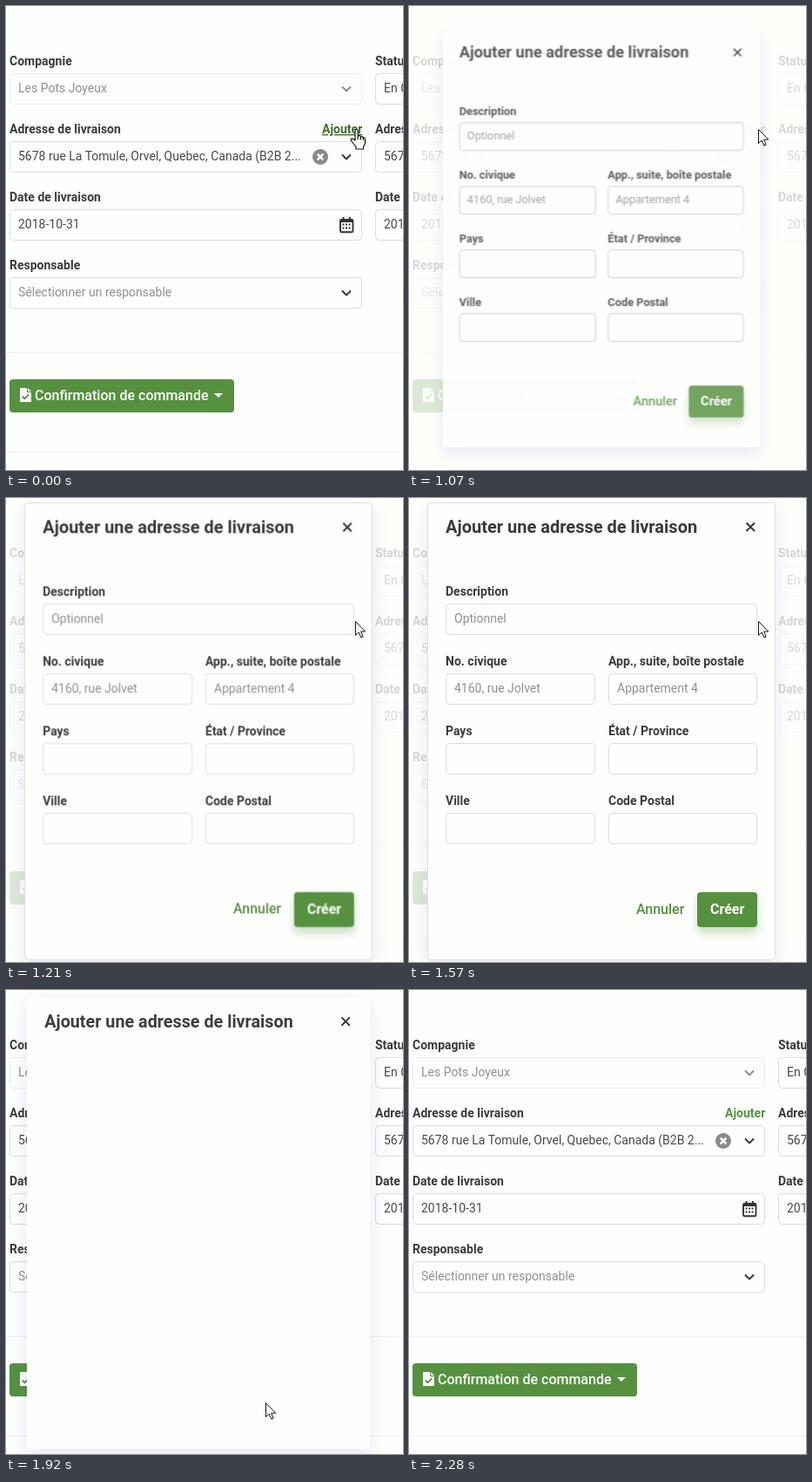
Animation, 456 px wide and 532 px high, one loop 2.35 s. Source, as an HTML page:

```html
<!DOCTYPE html>
<html lang="fr">
<head>
<meta charset="utf-8">
<title>Adresse de livraison</title>
<style>
  html, body { margin: 0; width: 100%; height: 100%; overflow: hidden; background: #fefefc; }
  svg { display: block; width: 100%; height: 100%; }
  text { font: 14px Roboto, sans-serif; fill: #484848; white-space: pre; }
  .label { font-weight: 700; fill: #3a3a3a; }
  .hint { fill: #909090; }
  .title { font-size: 20px; font-weight: 700; fill: #3a3a3a; }
  .link { font-weight: 700; fill: #55913f; }
  .action { font-size: 16px; font-weight: 500; }
  .hover { fill: #3c6f2b; text-decoration: underline; }
  .white { fill: #fff; }
  .field { fill: #fefefe; stroke: #dcdcdc; }
  .off { stroke: #eee; }
  .green { fill: #55913f; }
  .line { fill: none; stroke: #333; stroke-width: 1.9; }
  .rule { stroke: #efefef; }
  #sheet { fill: #fefefd; stroke: #dedede; filter: drop-shadow(0 7px 10px rgba(80, 80, 200, .13)); }
  #create { filter: drop-shadow(0 7px 5px rgba(85, 145, 63, .3)); }
  .moving #sheet { stroke: none; }
  .moving .field { stroke: #c0c0c0; }
  .cursor { fill: #fff; stroke: #111; stroke-linejoin: round; }
</style>
</head>
<body>
<svg viewBox="0 0 456 532">
  <g id="page"></g>
  <rect id="overlay" width="456" height="532" fill="#fefefc" opacity=".8"/>
  <g id="modal">
    <rect id="sheet" x="21.5" y="5.5" width="399" height="524" rx="4"/>
    <g id="content">
      <text class="title" x="42" y="40">Ajouter une adresse de livraison</text>
      <path class="line" d="M387.5 28.5l9.5 9.5m0-9.5l-9.5 9.5"/>
      <g id="form"></g>
    </g>
  </g>
  <path id="arrow" class="cursor" d="M.5 .5v16l3.7-3.5 2.6 6 2.4-1-2.6-5.9h5.1z"/>
  <path id="hand" class="cursor" stroke-width="1.2"
    d="M0 13V2Q0 .5 1.6 .5T3.2 2v6q2.6-1 3.2 1 2.2-.8 2.8 1 2.3-.3 2.3 2v4.5l-2 4v2.5H1v-2.5l-5.5-7q-1-2 .7-2.4T0 13zM3.2 8v4M6.4 9v3.5M9.2 10v3"/>
</svg>
<script>
const el = id => document.getElementById(id);
const text = (x, y, words, cls = '', id = '') => `<text id="${id}" class="${cls}" x="${x}" y="${y}">${words}</text>`;
const box = (x, y, w, cls = '') => `<rect class="field ${cls}" x="${x + .5}" y="${y + .5}" width="${w}" height="35" rx="4"/>`;
const chevron = (y, color = '#333') => `<path class="line" style="stroke:${color}" d="M386 ${y}l5 5 5-5"/>`;

// One labelled input; `top` is the upper edge of its box.
const field = (x, top, w, label, value = '', cls = '', boxCls = '') =>
  text(x, top - 9, label, 'label') + box(x, top, w, boxCls) + text(x + 10, top + 22, value, cls);

const clearIcon = `<circle cx="361" cy="173" r="9" fill="#8a8a8a"/>
  <path d="M357.7 169.7l6.6 6.6m0-6.6l-6.6 6.6" stroke="#fff" stroke-width="2.4"/>`;

let days = '';
for (let i = 0; i < 6; i++) days += `M${386.5 + i % 3 * 3.5} ${250.5 + (i / 3 | 0) * 4}h2`;
const calendarIcon = `<rect class="line" x="384" y="245" width="14.5" height="14.2" rx="1.5"/>
  <path class="line" d="M384 247h14.5M387.5 242v4M395 242v4"/><path class="line" d="${days}"/>`;

const fileIcon = `<path class="white" d="M17 438h7v5h5v10q0 1-1 1H17q-1 0-1-1v-14q0-1 1-1zM25 438l4 4h-4z"/>
  <path d="M18.8 447.5l2.6 2.6 4.8-4.8" fill="none" stroke="#55913f" stroke-width="1.9"/>`;

el('page').innerHTML =
  field(4, 77, 404, 'Compagnie', 'Les Pots Joyeux', 'hint', 'off') + chevron(92.5, '#8c8c8c') +
  field(4, 155, 404, 'Adresse de livraison', '5678 rue La Tomule, Orvel, Quebec, Canada (B2B 2...') +
  text(363, 146, 'Ajouter', 'link', 'add') + clearIcon + chevron(170.5) +
  field(4, 233, 404, 'Date de livraison', '2018-10-31') + calendarIcon +
  field(4, 311, 404, 'Responsable', 'Sélectionner un responsable', 'hint') + chevron(326.5) +
  field(424, 77, 404, 'Statut', 'En Cours') +
  field(424, 155, 404, 'Adresse de facturation', '5678 rue') +
  field(424, 233, 404, 'Date de commande', '2018-10-31') +
  `<path class="rule" d="M0 397.5h456M0 511.5h456"/>
  <rect class="green" x="4" y="428" width="258" height="38" rx="4"/>` + fileIcon +
  text(33, 452, 'Confirmation de commande', 'action white') +
  '<path class="white" d="M239 444h10l-5 5z"/>';

el('form').innerHTML =
  field(42, 121, 357, 'Description', 'Optionnel', 'hint') +
  field(42, 201, 171, 'No. civique', '4160, rue Jolvet', 'hint') +
  field(229, 201, 170, 'App., suite, boîte postale', 'Appartement 4', 'hint') +
  field(42, 281, 171, 'Pays') + field(229, 281, 170, 'État / Province') +
  field(42, 361, 171, 'Ville') + field(229, 361, 170, 'Code Postal') +
  text(261, 477, 'Annuler', 'link action', 'cancel') +
  '<rect id="create" class="green" x="331" y="452" width="69" height="40" rx="4"/>' +
  '<text class="action white" style="font-weight:700" x="346" y="477">Créer</text>';

const LOOP = 2350;
const TICKS = [0, 920, 1000, 1070, 1140, 1210, 1280, 1350, 1850, 1920, 2000, 2070, 2140, 2210, 2280];
const OPEN = 983, HOVER = 1850, CLOSE = 1918, DURATION = 260;

// cubic-bezier(.25, .8, .25, 1), solved for x by bisection
function ease(x) {
  if (x <= 0) return 0;
  if (x >= 1) return 1;
  let low = 0, high = 1;
  for (let i = 0; i < 24; i++) {
    const s = (low + high) / 2;
    if (.75 * s * (1 - s) + s ** 3 < x) low = s; else high = s;
  }
  return 2.4 * low * (1 - low) ** 2 + 3 * low ** 2 * (1 - low) + low ** 3;
}

const show = (id, on) => el(id).setAttribute('visibility', on ? 'visible' : 'hidden');

function render(now) {
  const t = TICKS.findLast(tick => tick <= now % LOOP);
  const shown = ease((t - OPEN) / DURATION) - ease((t - CLOSE) / DURATION);
  const scale = .5 + shown / 2;
  el('modal').setAttribute('transform', `translate(221 261) scale(${scale}) translate(-221 -261)`);
  el('modal').classList.toggle('moving', shown < .99);
  el('sheet').setAttribute('opacity', 1 - (1 - shown) ** 2);
  el('content').setAttribute('opacity', shown);
  show('overlay', t >= 920 && t < CLOSE);
  show('form', t < CLOSE);
  el('add').classList.toggle('hover', t < HOVER);
  el('cancel').classList.toggle('hover', t === HOVER);

  const pointing = t < 920 || t === HOVER;
  const place = t < HOVER ? 'translate(401 141)' : 'translate(298 473)';
  for (const id of ['arrow', 'hand']) {
    el(id).setAttribute('transform', place);
    show(id, t < 2280 && pointing === (id === 'hand'));
  }
}

const start = performance.now();
function frame() {
  render(performance.now() - start);
  requestAnimationFrame(frame);
}
frame();
</script>
</body>
</html>
```
